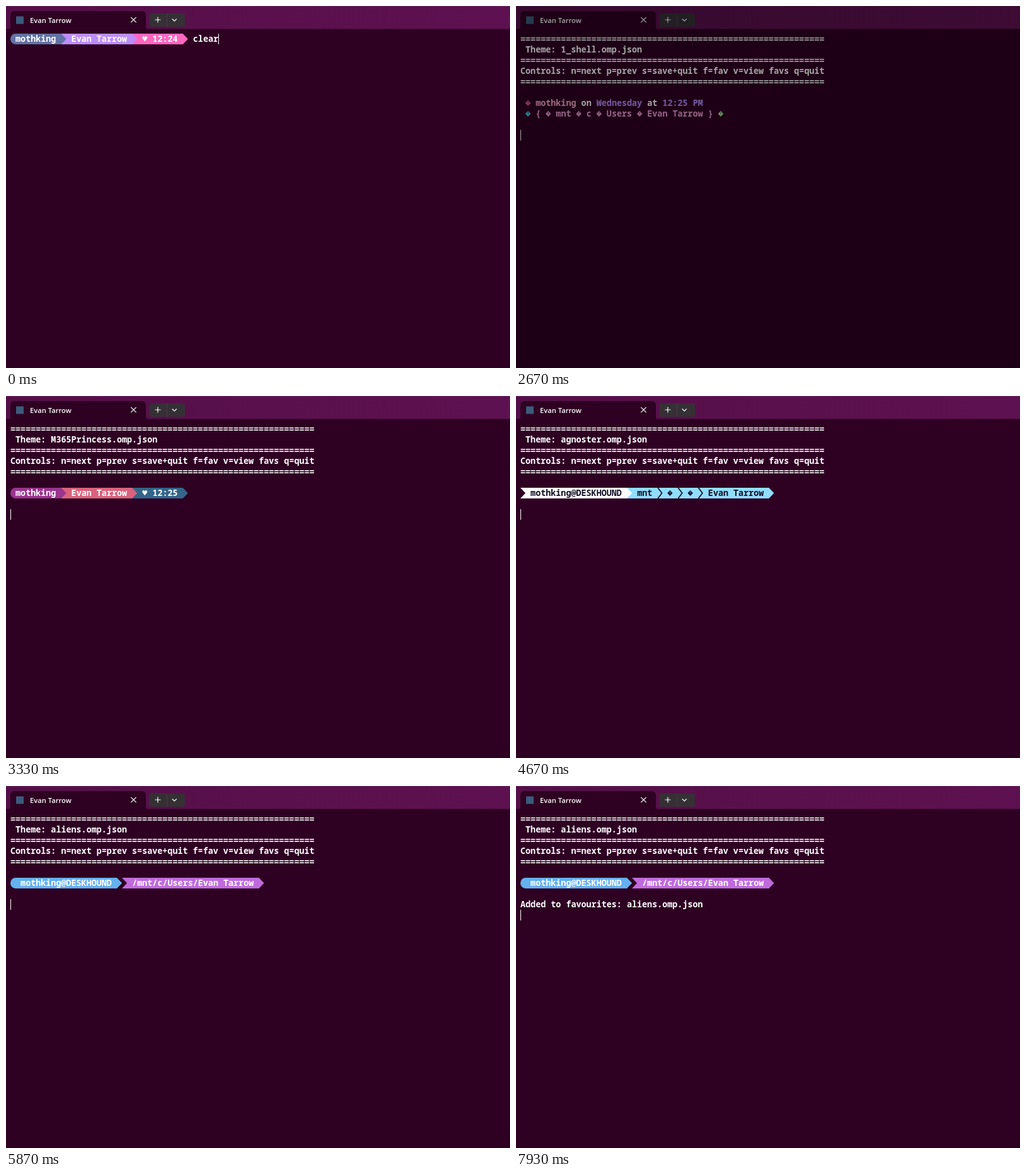
Animation, 800 px wide and 576 px high, one loop 8 s. Source, as an HTML page:

```html
<!DOCTYPE html>
<html lang="en">
<head>
<meta charset="utf-8">
<title>Prompt theme browser</title>
<style>
html, body { margin: 0; width: 100%; height: 100%; overflow: hidden; background: #2e0022; }
svg { display: block; width: 800px; height: 576px; }
.mono text { font: 600 13.417px 'Noto Sans Mono', 'DejaVu Sans Mono', monospace; white-space: pre; }
.mono .rule { font: 700 13.37px 'DejaVu Sans Mono', monospace; }
.tab { font: 600 11.2px 'Open Sans', 'Noto Sans', sans-serif; }
.scene { visibility: hidden; animation: 8s step-end infinite; }
#shell { animation-name: shell; }
#clear { animation-name: clear; }
#typing { animation-name: typing; }
#header { animation-name: header; }
#first { animation-name: first; }
#second { animation-name: second; }
#third { animation-name: third; }
#fourth { animation-name: fourth; }
#waiting { animation-name: waiting; }
#added { animation-name: added; }
#cover { animation: type 8s infinite; }
#black { opacity: 0; animation: dip 8s linear infinite; }
@keyframes shell { 0% { visibility: visible } 11.625%, 100% { visibility: hidden } }
@keyframes clear { 0% { visibility: visible } .875%, 100% { visibility: hidden } }
@keyframes typing { 0% { visibility: hidden } .875% { visibility: visible } 11.625%, 100% { visibility: hidden } }
@keyframes header { 0% { visibility: hidden } 11.625%, 100% { visibility: visible } }
@keyframes first { 0% { visibility: hidden } 11.625% { visibility: visible } 36.875%, 100% { visibility: hidden } }
@keyframes second { 0% { visibility: hidden } 36.875% { visibility: visible } 45.875%, 100% { visibility: hidden } }
@keyframes third { 0% { visibility: hidden } 45.875% { visibility: visible } 69.125%, 100% { visibility: hidden } }
@keyframes fourth { 0% { visibility: hidden } 69.125%, 100% { visibility: visible } }
@keyframes waiting { 0% { visibility: hidden } 36.875% { visibility: visible } 92.5%, 100% { visibility: hidden } }
@keyframes added { 0% { visibility: hidden } 92.5%, 100% { visibility: visible } }
@keyframes type {
  0%, .875% { transform: translateX(0); animation-timing-function: steps(10) }
  7.5%, 100% { transform: translateX(80.5px) }
}
@keyframes dip { 0%, 31.625% { opacity: 0 } 36.625%, 37.375% { opacity: 1 } 39.125%, 100% { opacity: 0 } }
</style>
</head>
<body>
<svg viewBox="0 0 800 576">
  <defs>
    <linearGradient id="bar">
      <stop offset="0" stop-color="#540f48"/>
      <stop offset="1" stop-color="#5e1150"/>
    </linearGradient>
  </defs>
  <rect width="800" height="576" fill="#2e0022"/>
  <rect width="800" height="36.5" fill="url(#bar)"/>
  <rect width="800" height="1" fill="#662058"/>
  <path d="M3 37q4 0 4-4V15q0-7 7-7H215q7 0 7 7V33q0 4 4 4z" fill="#2e0022"/>
  <rect x="16" y="16.5" width="12" height="12" fill="#3b5b7c"/>
  <text class="tab" x="38" y="27" fill="#fff">Evan Tarrow</text>
  <rect x="227" y="12" width="57" height="21" rx="4" fill="#343034"/>
  <path d="M255.5 12V33" stroke="#54324e"/>
  <g fill="none" stroke="#fff" stroke-width="1.2">
    <path d="M198.3 17.8l8.4 8.4m0-8.4l-8.4 8.4"/>
    <path d="M236.5 22h9m-4.5-4.5v9"/>
    <path d="M263.8 20.5l3.5 3.4l3.5-3.4"/>
  </g>
  <g id="screen" class="mono"></g>
  <rect id="black" width="800" height="576"/>
</svg>
<script>
const W = 8.05, H = 17, USER = 'mothking', HOST = 'DESKHOUND', HOME = 'Evan Tarrow';
const BG = '#2e0022', INK = '#100e23';
const x = col => 7 + col * W;
const y = row => 44 + row * H;

const text = (col, row, str, fill = '#fff', cls = '') =>
  `<text class="${cls}" x="${x(col)}" y="${y(row) + 13}" fill="${fill}">${str}</text>`;

const cursor = (col, row) =>
  `<rect x="${Math.round(x(col))}" y="${y(row)}" width="1" height="${H}" fill="#fff"/>`;

// Prompt block from column a to b with an arrow head in column b
const starts = { flat: 'z', notch: `l${W} -8.5z`, round: `a${W} 8.5 0 0 1 0 -17z` };
const block = (a, b, row, fill, start = 'flat') =>
  `<path d="M${x(a)} ${y(row)}H${x(b)}l${W} 8.5l${-W} 8.5H${x(a)}${starts[start]}" fill="${fill}"/>`;

const chevron = (col, row) =>
  `<path d="M${x(col) + .8} ${y(row)}l6.4 8.5l-6.4 8.5" fill="none" stroke="${INK}" stroke-width="1.7"/>`;

// Replacement glyph: a diamond with a small mark cut out
const gem = (col, row, fill, mark = BG) => {
  const cx = x(col) + W / 2, cy = y(row) + 8.5;
  return `<path d="M${cx - 4.2} ${cy}l4.2 -4.5l4.2 4.5l-4.2 4.5z" fill="${fill}"/>` +
    `<path d="M${cx - 1.1} ${cy - 1.3}q1.1 -1.2 2.1 0q0 .8 -1 1.4m0 1v.9" fill="none" stroke="${mark}" stroke-width=".8"/>`;
};

const scene = (id, ...parts) => `<g id="${id}" class="scene">${parts.join('')}</g>`;
const theme = name => text(1, 1, `Theme: ${name}.omp.json`);
const rule = row => text(0, row, '='.repeat(60), '#fff', 'rule');

const heartPrompt = (row, time, colors) =>
  block(24, 34, row, colors[2]) + block(10, 24, row, colors[1]) +
  block(1, 10, row, colors[0], 'round') +
  text(1, row, USER) + text(12, row, HOME) + text(26, row, '♥') + text(28, row, time);

const pink = '#e79ad0', violet = '#b48cf8';

document.getElementById('screen').innerHTML = [
  scene('shell', heartPrompt(0, '12:24', ['#6272a4', '#bd8df9', '#ff66c0'])),
  scene('clear', text(36, 0, 'clear'), cursor(41, 0)),
  scene('typing', text(36, 0, './theme.sh'),
    `<g id="cover"><rect x="${x(36)}" y="44" width="100" height="18" fill="${BG}"/>${cursor(36, 0)}</g>`),
  scene('header', rule(0), rule(2), rule(4),
    text(0, 3, 'Controls: n=next p=prev s=save+quit f=fav v=view favs q=quit')),
  scene('first', theme('1_shell'),
    gem(1, 6, '#e0559c'), text(3, 6, USER, '#f2a6c4'), text(12, 6, 'on'),
    text(15, 6, 'Wednesday', violet), text(25, 6, 'at'), text(28, 6, '12:25 PM', violet),
    gem(1, 7, '#43ccea'), text(3, 7, '{', pink),
    [5, 11, 15, 23].map(col => gem(col, 7, pink)).join(''),
    text(7, 7, 'mnt', pink), text(13, 7, 'c', pink), text(17, 7, 'Users', pink),
    text(25, 7, HOME, pink), text(37, 7, '}', pink), gem(39, 7, '#98f08c'),
    cursor(0, 9)),
  scene('second', theme('M365Princess'),
    heartPrompt(6, '12:25', ['#9a348e', '#da627d', '#33658a'])),
  scene('third', theme('agnoster'),
    block(21, 49, 6, '#91ddff'), block(0, 21, 6, '#fff', 'notch'),
    text(2, 6, `${USER}@${HOST}`, INK), text(23, 6, 'mnt', INK),
    [27, 31, 35].map(col => chevron(col, 6)).join(''),
    [29, 33].map(col => gem(col, 6, INK, '#91ddff')).join(''),
    text(37, 6, HOME, INK)),
  scene('fourth', theme('aliens'),
    block(1, 21, 6, '#64b1f0', 'round'), block(22, 49, 6, '#c06bdd', 'notch'),
    text(2, 6, `${USER}@${HOST}`), text(24, 6, `/mnt/c/Users/${HOME}`)),
  scene('waiting', cursor(0, 8)),
  scene('added', text(0, 8, 'Added to favourites: aliens.omp.json'), cursor(0, 9))
].join('');
</script>
</body>
</html>
```
